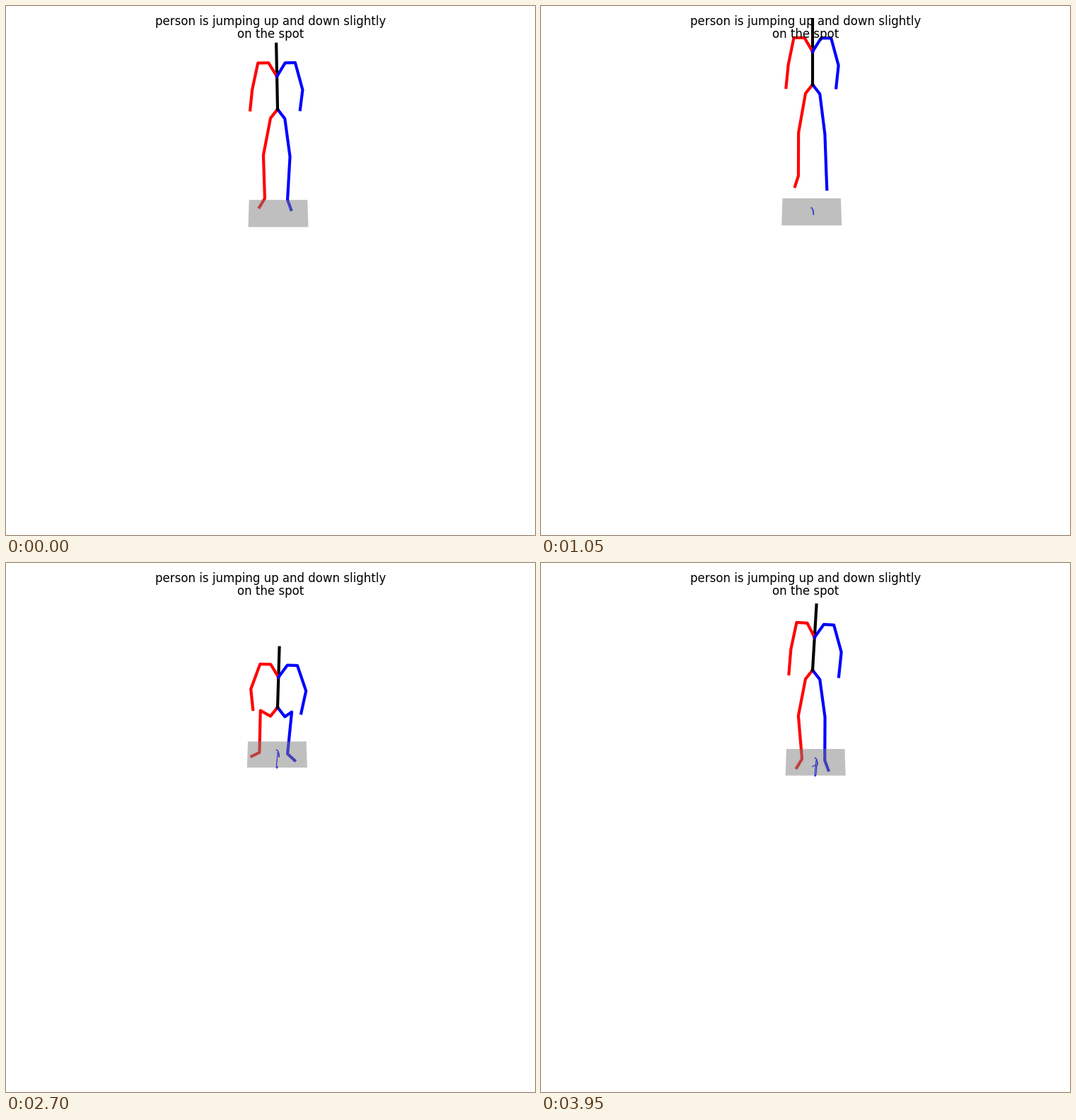
Write a matplotlib script that moves like this. It is 748 px wide and 748 px high and loops after 4000 ms.

```python
import numpy as np
import matplotlib.pyplot as plt
from matplotlib.animation import FuncAnimation

SIZE, DPI = 748, 100
FRAMES, STEP = 80, 50
TITLE = ["person is jumping up and down slightly", "on the spot"]
ROOT_X = 384
LEG_HEIGHT = 127
CROUCH_DEPTH = 74
TRAIL_END = np.array([384, 288])


def path(t, *keys):
    """Smooth cubic path through (ms, value) keys."""
    times, values = np.array(keys, float).T
    slopes = np.gradient(values, times)
    k = int(np.clip(np.searchsorted(times, t, "right") - 1, 0, len(times) - 2))
    h = times[k + 1] - times[k]
    u = (t - times[k]) / h
    return ((1 + 2 * u) * (1 - u) ** 2 * values[k]
            + u * (1 - u) ** 2 * h * slopes[k]
            + u * u * (3 - 2 * u) * values[k + 1]
            + u * u * (u - 1) * h * slopes[k + 1])


def hop(t, peak, half, height):
    """Ballistic rise and fall around the peak time."""
    return height * max(0, 1 - ((t - peak) / half) ** 2)


def lift(t):
    return hop(t, 1065, 214, 32) + hop(t, 3375, 196, 26)


def crouch(t):
    """0 is standing straight, 1 is the deepest squat."""
    return path(t, (0, .014), (100, -.03), (350, .216), (600, .44),
                (860, .02), (1050, -.03), (1270, 0), (1650, .5), (2150, 1),
                (2350, 1.02), (2750, .8), (3170, .03), (3250, .027),
                (3570, 0), (3800, -.03), (3950, .02))


def lean(t):
    return path(t, (0, -.02), (350, -.06), (1050, 0), (1650, .052),
                (2150, .05), (3250, .02), (3950, .06))


def reach(t):
    return path(t, (0, -4.5), (350, 2), (1050, -1), (1650, -2), (2150, 0),
                (3950, 2))


def ground(t):
    return path(t, (0, 272), (1650, 270.5), (2150, 267), (3250, 271.5),
                (3950, 277))


def floor_at(t):
    """Middle and lower edge of the floor, which slips as the body shifts."""
    x = path(t, (0, 385), (350, 381.7), (1050, 382.7), (2150, 385),
             (3250, 382.8), (3950, 388.2))
    return np.array([x, 312.8 - 18 * crouch(t) - 12 * t / 4000])


def floor_shape(t):
    x, y = floor_at(t)
    top = y - 37 - 0.06 * (y - 290)
    return [(x - 42.5, y), (x - 41.3, top), (x + 41.3, top), (x + 42.5, y)]


def pose(t):
    c, up, tilt, hand = crouch(t), lift(t), lean(t), reach(t)
    floor_x = floor_at(t)[0]
    ankle_y = ground(t) - up
    root = np.array([ROOT_X, ankle_y - LEG_HEIGHT + CROUCH_DEPTH * c])

    def torso(x, y):
        y *= 1 - 0.1 * c
        return root + (x - y * tilt, y + x * tilt)

    def leg(hip, knee_x, ankle, toe):
        ankle = np.array(ankle)
        knee = (ROOT_X + knee_x, ankle[1] - 61 + 2 * c)
        return [root, root + hip, knee, ankle, ankle + toe]

    def arm(collar, shoulder, upper, fore):
        top = torso(*shoulder)
        elbow = top + upper
        return [chest, torso(*collar), top, elbow, elbow + fore]

    chest = torso(0, -46.5)
    return [
        leg((-10, 12.5), -20 - 5 * c, (floor_x - 19 - 7 * c, ankle_y),
            (-7.5 - 4 * c + 0.08 * up, 12.7 - 8.5 * c + 0.06 * up)),
        leg((10.3, 13.3), 17.5 + 3 * c,
            (floor_x + 13 + 2 * c + 0.25 * up, ankle_y + 2),
            (5 + 6 * c - 0.13 * up, 14 - 5.5 * c + 0.08 * up)),
        [root, chest, torso(0, -80.5), torso(0, -92.3)],
        arm((-11.5, -66), (-26.5, -66),
            (-8 - 6 * c, 38 - 3 * c), (-3 + 7 * c, 33 - 6.5 * c + hand)),
        arm((12, -65.5), (26.2, -65.5),
            (10.5 + 2 * c, 38.5 - 3 * c),
            (-3.5 - 4 * c, 32.5 - 2.5 * c + hand)),
    ]


fig = plt.figure(figsize=(SIZE / DPI, SIZE / DPI), dpi=DPI, facecolor="white")
ax = fig.add_axes([0, 0, 1, 1])
ax.set_xlim(0, SIZE)
ax.set_ylim(SIZE, 0)
ax.axis("off")
for row, text in enumerate(TITLE):
    fig.text(0.5, 1 - (27 + 18 * row) / SIZE, text, fontsize=12,
             family="DejaVu Sans", ha="center", va="baseline")

trail, = ax.plot([], [], color="blue", lw=1, zorder=1)
limbs = [ax.plot([], [], color=color, lw=3, zorder=2 + i,
                 solid_capstyle="projecting", solid_joinstyle="round")[0]
         for i, color in enumerate(["red", "blue", "black", "red", "blue"])]
floor = plt.Polygon(floor_shape(0), closed=True, lw=0, zorder=10,
                    facecolor=(0.5, 0.5, 0.5, 0.5))
ax.add_patch(floor)

floor_path = np.array([floor_at(i * STEP) for i in range(FRAMES)])


def draw(i):
    t = i * STEP
    for line, points in zip(limbs, pose(t)):
        line.set_data(*np.array(points).T)
    # The walked path stays fixed to the floor
    trail.set_data(*(TRAIL_END + floor_path[i] - floor_path[:i + 1]).T)
    floor.set_xy(floor_shape(t))
    return [trail, floor, *limbs]


anim = FuncAnimation(fig, draw, frames=FRAMES, interval=STEP,
                     repeat=True, repeat_delay=0, blit=False)
plt.show()
```
